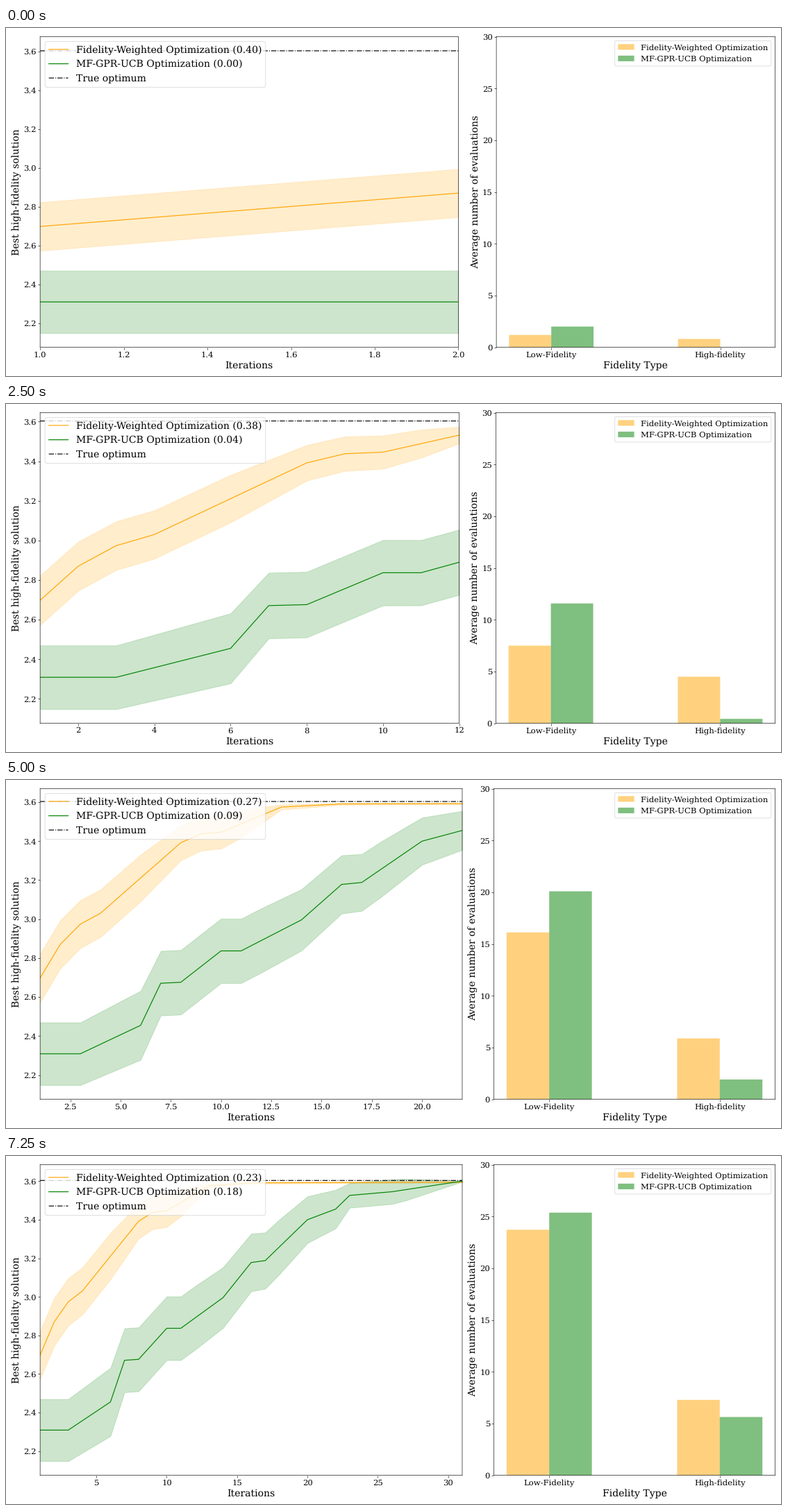
Write a matplotlib script that moves like this. It is 1116 px wide and 502 px high and loops after 8.75 s.

```python
import matplotlib.pyplot as plt
import numpy as np
from matplotlib.animation import FuncAnimation

LAST = 31        # iterations in the final picture
FRAMES = 35      # the final picture is held
INTERVAL = 250
OPTIMUM = 3.6035

plt.rcParams.update({
    "font.family": "DejaVu Serif",
    "axes.labelsize": 18,
    "xtick.labelsize": 15,
    "ytick.labelsize": 15,
    "text.hinting": "none",
    "path.snap": False,
})

iters = np.arange(1, LAST + 1)


def through(*points):
    """Value at every iteration on straight lines between key points."""
    return np.interp(iters, *zip(*points))


# Per method: best solution, half width of its band, high-fidelity count
METHODS = [
    dict(
        name="Fidelity-Weighted Optimization", color="orange",
        mean=through((1, 2.698), (2, 2.87), (3, 2.974), (4, 3.03), (8, 3.392),
                     (9, 3.438), (10, 3.446), (13, 3.575), (16, 3.591),
                     (31, 3.595)),
        half=through((1, .125), (6, .12), (8, .09), (10, .084), (11, .071),
                     (13, .013), (16, .005), (31, .003)),
        high=through((0, 0), (9, 3.63), (12, 4.5), (15, 5.14), (19, 5.62),
                     (25, 6.14), (31, 7.28)),
    ),
    dict(
        name="MF-GPR-UCB Optimization", color="green",
        mean=through((3, 2.309), (6, 2.455), (7, 2.671), (8, 2.676),
                     (10, 2.837), (11, 2.837), (14, 2.996), (16, 3.178),
                     (17, 3.188), (20, 3.4), (22, 3.455), (23, 3.526),
                     (26, 3.545), (31, 3.6)),
        half=through((3, .161), (6, .177), (7, .166), (12, .165), (18, .142),
                     (22, .1), (23, .064), (26, .064), (27, .056),
                     (31, .003)),
        high=through((3, 0), (9, .27), (15, .58), (19, 1.1), (25, 2.72),
                     (31, 5.63)),
    ),
]

# 1116 by 502 pixels
fig, (ax_best, ax_evals) = plt.subplots(
    1, 2, figsize=(20, 8.9965), dpi=55.8,
    gridspec_kw={"width_ratios": [3, 2]})


def draw_best(ax, n):
    x = iters[:n]
    for m in METHODS:
        mean, half = m["mean"][:n], m["half"][:n]
        share = m["high"][n - 1] / n
        ax.plot(x, mean, color=m["color"], label=f"{m['name']} ({share:.2f})")
        ax.fill_between(x, mean - half, mean + half,
                        color=m["color"], alpha=0.2)
    ax.axhline(OPTIMUM, color="black", linestyle="-.", label="True optimum")
    ax.set_xlim(1, n)
    ax.set_xlabel("Iterations")
    ax.set_ylabel("Best high-fidelity solution")
    ax.legend(loc="upper left", fontsize=18)


def draw_evals(ax, n):
    width = 0.25
    x = np.arange(2)
    for side, m in zip((-0.5, 0.5), METHODS):
        high = m["high"][n - 1]
        ax.bar(x + side * width, [n - high, high], width,
               color=m["color"], alpha=0.5, label=m["name"])
    ax.set_ylim(0, 30)
    ax.set_xticks(x, ["Low-Fidelity", "High-fidelity"])
    ax.set_xlabel("Fidelity Type")
    ax.set_ylabel("Average number of evaluations")
    ax.legend(loc="upper right", fontsize=15)


def update(i):
    n = min(i + 2, LAST)
    for ax, draw in ((ax_best, draw_best), (ax_evals, draw_evals)):
        ax.clear()
        draw(ax, n)
    fig.tight_layout()


anim = FuncAnimation(fig, update, frames=FRAMES, interval=INTERVAL,
                     init_func=lambda: None, repeat=True, repeat_delay=0)
plt.show()
```
